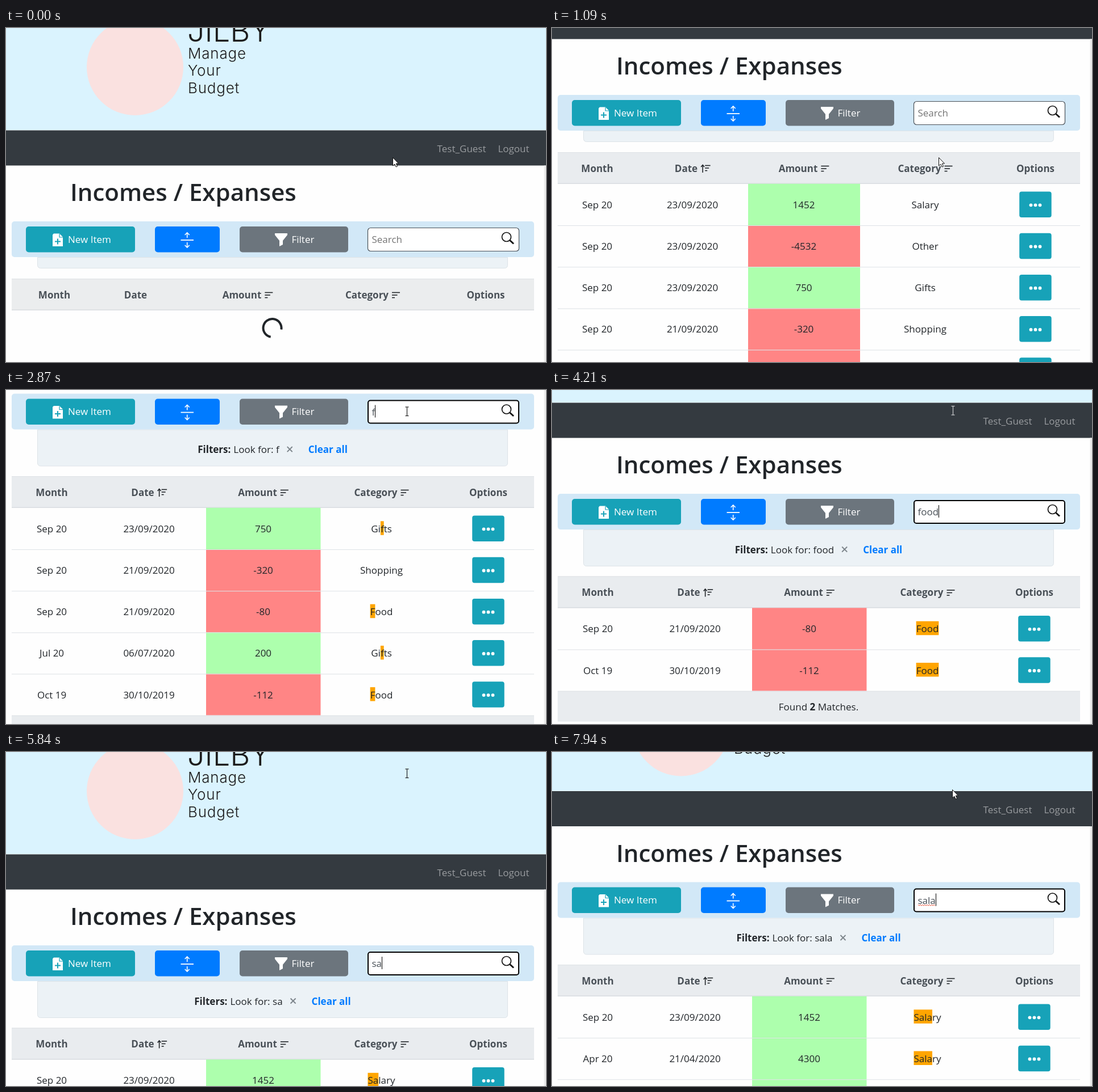
These frames come from a looping animation (950x589 px, 8 s). An HTML page with a canvas:

```html
<!DOCTYPE html>
<html lang="en">
<head>
<meta charset="utf-8">
<title>Incomes / Expanses</title>
<style>
html, body { margin: 0; width: 100%; height: 100%; overflow: hidden; background: #fefefe; }
canvas { display: block; width: 950px; height: 589px; }
</style>
</head>
<body>
<canvas id="stage" width="950" height="589"></canvas>
<script>
const W = 950, H = 589, LOOP = 8000;
const ctx = document.getElementById('stage').getContext('2d');
const SANS = '"Open Sans", "Noto Sans", sans-serif';
const BODY = `17px ${SANS}`, BOLD = `700 17px ${SANS}`;
const INK = '#212529', HEAD = '#495057', GREY = '#e9ecef', LINE = '#dee2e6', TEAL = '#17a2b8', BLUE = '#007bff';
const ROW = 73.2;

const DATA = [
  ['Sep 20', '23/09/2020', 1452, 'Salary'],
  ['Sep 20', '23/09/2020', -4532, 'Other'],
  ['Sep 20', '23/09/2020', 750, 'Gifts'],
  ['Sep 20', '21/09/2020', -320, 'Shopping', 'gift'],
  ['Sep 20', '21/09/2020', -80, 'Food'],
  ['Aug 20', '14/08/2020', -150, 'Other'],
  ['Jul 20', '06/07/2020', 200, 'Gifts'],
  ['Apr 20', '21/04/2020', 4300, 'Salary'],
  ['Mar 20', '25/03/2020', 4300, 'Salary'],
  ['Oct 19', '30/10/2019', -112, 'Food']
];

// Column centres; "cell" is the left and right edge of the amount column.
const WIDE = { month: 79.5, date: 247, amount: 443, cat: 656.5, opt: 850.5, cell: [345, 542] };
const NARROW = { month: 80.5, date: 251.5, amount: 452.5, cat: 660.5, opt: 848.5, cell: [352, 553.5] };
const EMPTY = { month: 85, date: 228, amount: 425, cat: 645, opt: 844 };

// Screen updates: [first, last, count]
const UPDATES = [
  [0, 0, 1], [70, 450, 6], [920, 1090, 3], [1330, 2110, 11], [2190, 2190, 1], [2280, 2400, 2],
  [2810, 2870, 2], [3420, 3420, 1], [3820, 3820, 1], [4210, 4210, 1], [4830, 4830, 1],
  [4980, 5070, 2], [5220, 5300, 2], [5530, 5530, 1], [5840, 5840, 1], [6080, 6080, 1],
  [6680, 6680, 1], [7150, 7410, 4], [7560, 7940, 6]
];
const TYPED = [
  [0, ''], [2810, 'f'], [3420, 'fo'], [3820, 'foo'], [4210, 'food'], [4830, 'foo'], [4980, 'fo'],
  [5070, 'f'], [5220, ''], [5530, 's'], [5840, 'sa'], [6080, 'sal'], [7560, 'sala']
];
// Scroll moves: [start, end, target]
const SCROLL = [
  [222, 450, 111.5], [835, 1090, 223], [1252, 1486, 334.5], [3420, 3420, 158],
  [5070, 5070, 334.5], [5220, 5220, 0], [7484, 7940, 111.5]
];

const clamp = x => Math.max(0, Math.min(1, x));
const ease = x => x * x * (3 - 2 * x);
const between = (t, a, b) => t >= a && t < b;

function snap(t) {
  const [a, b, n] = UPDATES.filter(u => u[0] <= t).pop();
  if (n === 1) return a;
  const gap = (b - a) / (n - 1);
  return a + Math.min(n - 1, Math.floor((t - a) / gap + 1e-6)) * gap;
}

function scrollAt(t) {
  let y = 0;
  for (const [a, b, to] of SCROLL) {
    if (t < a) break;
    y += (to - y) * (b > a ? ease(clamp((t - a) / (b - a))) : 1);
  }
  return y;
}

function rect(x, y, w, h, fill, r = 0, stroke, lw = 1) {
  ctx.beginPath();
  ctx.roundRect(x, y, w, h, r);
  if (fill) { ctx.fillStyle = fill; ctx.fill(); }
  if (stroke) { ctx.strokeStyle = stroke; ctx.lineWidth = lw; ctx.stroke(); }
}

function disc(x, y, r, fill) {
  ctx.beginPath();
  ctx.arc(x, y, r, 0, 7);
  ctx.fillStyle = fill;
  ctx.fill();
}

// Polyline from a flat list of coordinates.
function path(points, color, lw, fill) {
  ctx.beginPath();
  for (let i = 0; i < points.length; i += 2) ctx.lineTo(points[i], points[i + 1]);
  if (fill) { ctx.closePath(); ctx.fillStyle = fill; ctx.fill(); }
  if (lw) { ctx.strokeStyle = color; ctx.lineWidth = lw; ctx.stroke(); }
}

function width(str, font = BODY) {
  ctx.font = font;
  return ctx.measureText(str).width;
}

function text(str, x, y, color = INK, font = BODY, align = 'left') {
  ctx.font = font;
  ctx.fillStyle = color;
  ctx.textAlign = align;
  ctx.fillText(str, x, y);
}

function banner() {
  rect(0, -400, W, 580, '#daf3fe');
  disc(227, 69, 85, '#fae1e0');
  text('JILBY', 319, 24, '#1c1c1c', '300 54px Inter, sans-serif');
  ctx.letterSpacing = '0.8px';
  ['Manage', 'Your', 'Budget'].forEach((word, i) =>
    text(word, 320, 53.5 + i * 30.5, '#1c1c1c', '300 26px Inter, sans-serif'));
  ctx.letterSpacing = '0px';
  rect(0, 180.5, W, 62, '#343a40');
  text('Test_Guest', 801.5, 219, '#999c9f', BODY, 'center');
  text('Logout', 893, 219, '#999c9f', BODY, 'center');
  rect(946.5, 242.5, 4, 3000, '#ebebeb');
  text('Incomes / Expanses', 113, 305, INK, `600 42px ${SANS}`);
}

function toolbar(s) {
  rect(10, 341, 919, 63, '#d2e8f7', 5);

  rect(35, 350, 192, 45.5, TEAL, 5);
  path([84, 362.5, 94, 362.5, 100, 368.5, 100, 385, 82, 385, 82, 364.5], 0, 0, '#fff');
  path([94, 363, 94, 369, 100, 369], TEAL, 1.2);
  path([91, 371.5, 91, 381.5], TEAL, 2);
  path([86, 376.5, 96, 376.5], TEAL, 2);
  text('New Item', 109, 378.5, '#fff');

  rect(262, 350, 114, 45.5, BLUE, 5);
  path([307.5, 374, 330, 374], '#fff', 1.8);
  for (const d of [-1, 1]) {
    path([318.7, 374 + 4 * d, 318.7, 374 + 13 * d], '#fff', 1.6);
    path([314.7, 374 + 9 * d, 318.7, 374 + 13 * d, 322.7, 374 + 9 * d], '#fff', 1.6);
  }

  rect(411, 350, 191, 45.5, '#6c757d', 5);
  path([473, 362, 495, 362, 495, 365, 487, 375, 487, 382, 481, 385, 481, 375, 473, 365], 0, 0, '#fff');
  text('Filter', 502.5, 378.5, '#fff');

  if (s.focus) rect(637, 353, 265, 40, '#fff', 4, '#000', 2);
  else rect(636.5, 352.5, 266, 41, '#fff', 5, '#495057', 1.2);
  text(s.typed || 'Search', 643.5, 379, s.typed ? HEAD : '#757575');
  const end = 643.5 + (s.typed ? width(s.typed) : 0);
  if (s.squiggle) {
    const wave = [];
    for (let x = 644; x <= end; x += 2) wave.push(x, 381.5 + (x % 4 ? 1.2 : -0.8));
    path(wave, '#e5482d', 1);
  }
  if (s.caret) rect(Math.round(end), 361, 1, 22, '#000');
  ctx.beginPath();
  ctx.arc(880.5, 368.5, 8, 0, 7);
  ctx.strokeStyle = '#111';
  ctx.lineWidth = 1.7;
  ctx.stroke();
  path([886.5, 374.5, 893, 380.5], '#111', 2.8);
}

function filterPanel(query) {
  rect(55.5, 404.5, 827, query ? 64 : 19, '#ecf2f6', [0, 0, 5, 5], '#dde3e8');
  if (!query) return;
  const look = 'Look for: ' + query;
  const a = width('Filters:', BOLD), b = width(look), c = width('Clear all', BOLD);
  let x = 469 - (a + 5 + b + 51 + c) / 2;
  text('Filters:', x, 445.5, INK, BOLD);
  x += a + 5;
  text(look, x, 445.5);
  x += b + 14;
  path([x, 434.5, x + 9, 443.5], '#7d858b', 1.8);
  path([x + 9, 434.5, x, 443.5], '#7d858b', 1.8);
  text('Clear all', x + 37, 445.5, BLUE, BOLD);
}

function bars(x, y, widths) {
  widths.forEach((w, i) => path([x, y - 4.5 + i * 4.5, x + w, y - 4.5 + i * 4.5], INK, 1.6));
}

function heading(label, cx, y, icon) {
  const w = width(label, BOLD), size = icon === 'up' ? 22 : icon ? 20 : 0;
  const x = cx - (w + size) / 2, ix = x + w + 6;
  text(label, x, y + 6.5, HEAD, BOLD);
  if (icon === 'list') bars(ix, y + 1, [14, 9.5, 5]);
  if (icon === 'up') {
    path([ix + 3, y + 8, ix + 3, y - 5], INK, 1.6);
    path([ix, y - 2, ix + 3, y - 5.5, ix + 6, y - 2], INK, 1.6);
    bars(ix + 7, y, [9.5, 7, 4]);
  }
}

function tableHead(y, cols, loading) {
  rect(10, y, 919, 56, loading ? '#ebedee' : GREY);
  rect(10, y, 919, 1, LINE);
  rect(10, y + 54.5, 919, 1.5, '#d9dde1');
  const cy = y + 28;
  heading('Month', cols.month, cy);
  heading('Date', cols.date, cy, loading ? '' : 'up');
  heading('Amount', cols.amount, cy, 'list');
  heading('Category', cols.cat, cy, 'list');
  heading('Options', cols.opt, cy);
}

function tableRow(y, cols, [month, date, amount, cat], query, first) {
  const base = y + 43, [left, right] = cols.cell;
  rect(left, y, right - left, ROW, amount < 0 ? '#ff8585' : '#adffad');
  if (!first) rect(10, y, 919, 1, LINE);
  text(month, cols.month, base, INK, BODY, 'center');
  text(date, cols.date, base, INK, BODY, 'center');
  text(amount, cols.amount, base, INK, BODY, 'center');
  const x = cols.cat - width(cat) / 2;
  const at = query ? cat.toLowerCase().indexOf(query) : -1;
  if (at >= 0) rect(x + width(cat.slice(0, at)), y + 23.5, width(cat.substr(at, query.length)), 24.5, '#ffa500');
  text(cat, x, base);
  rect(cols.opt - 28.3, y + 13.7, 56.5, 45.5, TEAL, 4);
  for (const d of [-8, 0, 8]) disc(cols.opt + d, y + 37.5, 2.9, '#fff');
}

function subtotal(y, month) {
  const sums = DATA.filter(r => r[0] === month).map(r => r[2]);
  const add = list => list.reduce((a, b) => a + b, 0);
  const gain = add(sums.filter(v => v > 0)), loss = add(sums.filter(v => v < 0));
  rect(10, y, 919, 55.5, GREY);
  rect(10, y, 919, 1, LINE);
  text(`-- ${month} --`, 177, y + 34.5, INK, BOLD, 'center');
  text(`In: ${gain} , Out: ${loss}`, 787, y + 34.5, INK, `13.3px ${SANS}`, 'right');
  rect(790, y + 2.5, 125, 49, gain + loss < 0 ? '#f4a9a9' : '#b9f3b9');
  text(`Total: ${gain + loss}`, 852.5, y + 34.5, INK, BOLD, 'center');
}

function matches(y, count) {
  rect(10, y, 919, 54, GREY);
  rect(10, y, 919, 1, LINE);
  const w = [width('Found '), width(count, BOLD), width(' Matches.')];
  const x = 469 - (w[0] + w[1] + w[2]) / 2;
  text('Found ', x, y + 34.5);
  text(count, x + w[0], y + 34.5, INK, BOLD);
  text(' Matches.', x + w[0] + w[1], y + 34.5);
}

function table(s) {
  const top = s.query ? 486.5 : 442;
  if (s.loading) {
    tableHead(top, EMPTY, true);
    const turn = (s.t / 750) * Math.PI * 2;
    ctx.beginPath();
    ctx.arc(468.5, 529, 16, turn + 1.75, turn + 6.45);
    ctx.strokeStyle = INK;
    ctx.lineWidth = 4;
    ctx.stroke();
    return;
  }
  const cols = s.query.length > 1 || s.query === 'f' ? NARROW : WIDE;
  const found = DATA.filter(r => (r[3] + ' ' + (r[4] || '')).toLowerCase().includes(s.query) &&
    !(s.query.length > 1 && !r[3].toLowerCase().includes(s.query)));
  tableHead(top, cols, false);
  let y = top + 55.8;
  found.forEach((row, i) => {
    tableRow(y, cols, row, s.query, i === 0);
    y += ROW;
    const next = found[i + 1];
    if (!s.query && (!next || next[0] !== row[0])) {
      subtotal(y, row[0]);
      y += 55.5;
    }
  });
  if (s.query) matches(y, found.length);
}

function arrow(x, y) {
  path([x, y, x, y + 14.5, x + 3.3, y + 11.5, x + 5.7, y + 16.5, x + 8, y + 15.5,
    x + 5.8, y + 10.5, x + 10, y + 10.5, x, y], '#111', 1, '#fff');
}

function beam(x, y, color) {
  path([x, y - 7, x, y + 8], color, 1.2);
  for (const d of [-7.5, 8]) path([x - 3, y + d, x + 3, y + d], color, 1.2);
}

function pointer(t, scroll) {
  if (t < 2190) {
    const k = ease(clamp((t - 1486) / 624));
    arrow(680.5 + 22 * k, 228.5 - 196 * k);
  } else if (t < 7150) {
    const dark = between(37, 180 - scroll, 242 - scroll);
    beam(705.5, dark ? 36 : 37.5, dark ? '#c9cbcd' : '#222');
  } else {
    arrow(704.5, 33.5 + 33 * ease(clamp((t - 7150) / 260)));
  }
}

function draw(time) {
  const t = snap(time), scroll = scrollAt(t);
  const typed = TYPED.filter(k => k[0] <= t).pop()[1];
  const s = {
    t, typed,
    query: between(t, 2810, 2870) ? '' : typed,
    loading: t < 222 || between(t, 5220, 5300),
    focus: t >= 2280,
    caret: t >= 2400 && !between(t, 5070, 5220) && !between(t, 6680, 7150),
    squiggle: t >= 7150
  };
  rect(0, 0, W, H, '#fefefe');
  ctx.save();
  ctx.translate(0, -scroll);
  banner();
  filterPanel(s.query);
  toolbar(s);
  table(s);
  ctx.restore();
  pointer(t, scroll);
}

let start;
function tick(now) {
  start ??= now;
  draw((now - start) % LOOP);
  requestAnimationFrame(tick);
}
requestAnimationFrame(tick);
</script>
</body>
</html>
```
